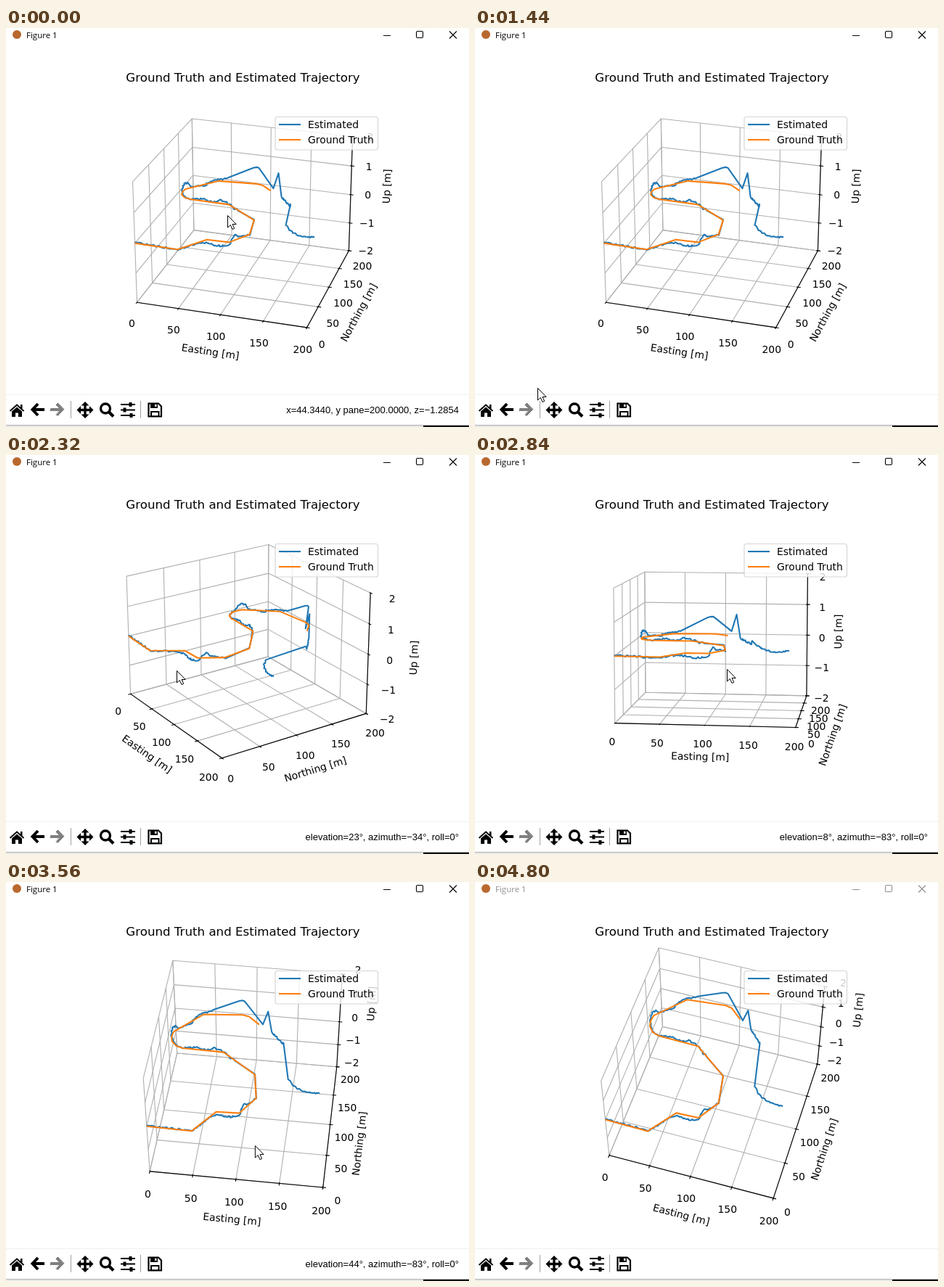
An HTML page with a canvas for the animation above (4.84 s loop, 638 by 550 pixels).

```html
<!DOCTYPE html>
<html lang="en">
<head>
<meta charset="utf-8">
<title>Figure 1</title>
<style>
  html, body { margin: 0; width: 100%; height: 100%; overflow: hidden; background: #fff; }
  canvas { display: block; }
</style>
</head>
<body>
<canvas id="stage" width="638" height="550"></canvas>
<script>
const ctx = document.getElementById('stage').getContext('2d');
const LOOP = 4840, DRAG_START = 1900, DRAG_END = 3960, BLUR = 4480;
const BLUE = '#1f77b4', ORANGE = '#ff7f0e', GRID = '#b0b0b0';
const SANS = '"DejaVu Sans", sans-serif', UI = '"Liberation Sans", Arial, sans-serif';

// Camera: perspective from distance 10, data box scaled to 4:4:3
const CX = 331.6, CY = 262, SCALE = 1998, DIST = 10;
const MID = [100, 100, 0], EXT = [100, 100, 2], HALF = [.59526, .59526, .44644];
const TICKS = [[0, 50, 100, 150, 200], [0, 50, 100, 150, 200], [-2, -1, 0, 1, 2]];
const NAMES = ['Easting [m]', 'Northing [m]', 'Up [m]'];
const SIDE = [1, 0, 0];

// time, cursor x, cursor y, azimuth, elevation
const KEYS = [
  [0, 305, 258, -73, 25], [300, 305, 258, -73, 25], [1100, 100, 470, -73, 25],
  [1440, 86, 496, -73, 25], [1900, 315, 301, -73, 25], [2320, 235, 297, -34, 23],
  [2840, 347, 295, -83, 8], [3280, 365, 347, -93, 34], [3840, 321, 379, -73, 54],
  [3960, 321, 379, -73, 54], [4360, 330, 560, -73, 54], [4840, 330, 560, -73, 54]
];

const truth = [
  [0, 0], [51, -1], [74, 32], [100, 33], [116, 59], [110, 97], [69, 130], [20, 131],
  [12, 134], [6, 141], [4, 149], [5, 158], [36, 193], [83, 198], [91, 196], [105, 183]
].map(p => [...p, 0]);

const estimate = roughen([
  [0, 0, .03], [20, 0, 0], [38, 1, -.03], [51, 0, -.03], [60, 11, -.01], [68, 24, -.03],
  [75, 31, -.09], [90, 30, -.14], [100, 33, -.09], [104, 42, .16], [107, 46, .05],
  [112, 50, .05], [116, 60, -.04], [110, 97, .02], [84, 118, -.02], [70, 129, .03],
  [57, 133, .1], [48, 131, -.01], [35, 132, .05], [20, 131, -.01], [11, 135, .02],
  [4, 147, .05], [4, 156, .22], [7, 161, .2], [10, 163, .04], [23, 175, -.01],
  [28, 186, .04], [36, 194, .04], [47, 198, .11], [78, 200, .53], [82, 200.5, .56],
  [85, 199.5, .56], [89, 196, .5], [110, 177, .17], [116, 178, .71], [121, 174, -.04],
  [136, 160, -.18], [137, 157, -.06], [149, 93, .02], [155, 86, -.04], [166, 81, -.11],
  [177, 79, -.1], [187, 77.5, -.04]
]);

// Adds small seeded steps along short, low segments
function roughen(points) {
  let seed = 7;
  const noise = size => {
    seed = seed * 16807 % 2147483647;
    return (seed / 2147483647 - .5) * size;
  };
  const result = [points[0]];
  points.slice(1).forEach((b, i) => {
    const a = points[i], length = Math.hypot(b[0] - a[0], b[1] - a[1]);
    const smooth = length > 30 || Math.max(a[2], b[2]) > .3;
    const steps = smooth ? 1 : Math.ceil(length / 2);
    for (let k = 1; k < steps; k++) {
      const p = a.map((c, j) => c + (b[j] - c) * k / steps);
      result.push([p[0] + noise(1.6), p[1] + noise(1.6), p[2] + noise(.06)]);
    }
    result.push(b);
  });
  return result;
}

const dot = (a, b) => a[0] * b[0] + a[1] * b[1] + a[2] * b[2];
const put = (p, i, value) => p.map((c, j) => j === i ? value : c);
const minus = s => String(s).replace('-', '\u2212');
let cam;

function setCamera(azimuth, elevation) {
  const a = azimuth * Math.PI / 180, e = elevation * Math.PI / 180;
  const ca = Math.cos(a), sa = Math.sin(a), ce = Math.cos(e), se = Math.sin(e);
  cam = {
    right: [-sa, ca, 0], up: [-se * ca, -se * sa, ce], dir: [ce * ca, ce * sa, se],
    far: [ca > 0 ? 0 : 200, 200, -2], near: [ca > 0 ? 200 : 0, 0, 2]
  };
}

function project(p) {
  const q = p.map((c, i) => (c - MID[i]) / EXT[i] * HALF[i]);
  const k = SCALE / (DIST - dot(q, cam.dir));
  return [CX + k * dot(q, cam.right), CY - k * dot(q, cam.up)];
}

function line(points, color, width) {
  ctx.beginPath();
  points.forEach(p => ctx.lineTo(...project(p)));
  ctx.strokeStyle = color;
  ctx.lineWidth = width;
  ctx.stroke();
}

function text(s, x, y, font, align = 'left', color = '#000') {
  ctx.font = font;
  ctx.textAlign = align;
  ctx.fillStyle = color;
  ctx.fillText(s, x, y);
}

// Moves a point away from the box centre, except along axis i
const outward = (p, i, part) =>
  p.map((c, j) => j === i ? c : c + Math.sign(c - MID[j]) * part * 2 * EXT[j]);

function drawGrid(i) {
  const [j, k] = [0, 1, 2].filter(n => n !== i), { near, far } = cam;
  for (const c of TICKS[i]) {
    const corner = put(far, i, c);
    line([put(corner, j, near[j]), corner, put(corner, k, near[k])], GRID, 1.11);
  }
}

function drawAxis(i) {
  const side = SIDE[i], edge = put(cam.far, side, cam.near[side]);
  const ends = [put(edge, i, TICKS[i][0]), put(edge, i, TICKS[i][4])];
  line(ends, '#000', 1.11);
  for (const c of TICKS[i]) {
    const p = put(edge, i, c), step = Math.sign(p[side] - MID[side]) * EXT[side] / 30;
    line([put(p, side, p[side] - step / 2), put(p, side, p[side] + step)], '#000', 1.11);
    const [x, y] = project(outward(p, i, .0864));
    text(minus(c), x, y + 10.6, '13.9px ' + SANS, 'center');
  }
  const [a, b] = ends.map(project);
  let angle = Math.atan2(a[1] - b[1], b[0] - a[0]);
  if (angle > Math.PI / 2) angle -= Math.PI;
  if (angle < -Math.PI / 2) angle += Math.PI;
  ctx.save();
  ctx.translate(...project(outward(put(edge, i, MID[i]), i, .188)));
  ctx.rotate(-angle);
  text(NAMES[i], 0, 3.2, '13.9px ' + SANS, 'center');
  ctx.restore();
}

function drawLegend() {
  ctx.globalAlpha = .8;
  ctx.beginPath();
  ctx.roundRect(371, 122.5, 141.5, 45.5, 3);
  ctx.fillStyle = '#fff';
  ctx.fill();
  ctx.strokeStyle = '#ccc';
  ctx.lineWidth = 1.2;
  ctx.stroke();
  ctx.globalAlpha = 1;
  [['Estimated', BLUE], ['Ground Truth', ORANGE]].forEach(([name, color], i) => {
    const y = 133 + i * 21;
    ctx.fillStyle = color;
    ctx.fillRect(376, y - 1, 30, 2.1);
    text(name, 416, y + 5, '13.9px ' + SANS);
  });
}

function path(d, width, color = '#000') {
  const shape = new Path2D(d);
  ctx.fillStyle = ctx.strokeStyle = color;
  if (!width) return ctx.fill(shape, 'evenodd');
  ctx.lineWidth = width;
  ctx.stroke(shape);
}

const tile = document.createElement('canvas');
tile.width = tile.height = 2;
const tileCtx = tile.getContext('2d');
tileCtx.fillRect(0, 0, 1, 1);
tileCtx.fillRect(1, 1, 1, 1);
const checker = ctx.createPattern(tile, 'repeat');

function drawToolbar(status) {
  ctx.fillStyle = '#f0f0f0';
  ctx.fillRect(0, 505, 638, 1);
  path('M5.500 528L15 519.500L24.500 528', 2);
  path('M8 528.500L15 522.500L22 528.500V536H17V530.500H13V536H8ZM20 519H22.500V525L20 523Z');
  path('M44 518L36.500 526L44 534M37 526H53', 4);
  path('M70 518L77.500 526L70 534M61 526H77', 4, checker);
  path('M89.500 514V538M185.500 514V538', 1, '#a0a0a0');
  path('M101 526.500H117M109 518.500V534.500', 3.4);
  path('M97.500 526.500L103 521V532ZM120.500 526.500L115 521V532ZM109 515L103.500 520.500H114.500ZM109 538L103.500 532.500H114.500Z');
  path('M130.500 524.500a6.500 6.500 0 1 0 13 0a6.500 6.500 0 1 0 -13 0', 3.3);
  path('M142 529.500L148 535.500', 4.2);
  path('M158 519H178M158 526.500H178M158 534H178', 2);
  path('M171.500 516V522M163.500 523.500V529.500M172.500 531V537', 4);
  path('M196.500 517.500H210L214 521.500V535.500H196.500Z', 2.2);
  path('M199 517H209V524H199ZM205 518.500V522H207.500V518.500ZM199 528H211.500V536H199ZM201 530V534.500H209.500V530Z');
  text(status, 624, 531, '13px ' + UI, 'right');
  ctx.fillStyle = '#b4b4b4';
  ctx.fillRect(0, 547, 638, 1);
  ctx.fillStyle = '#e4e4e4';
  ctx.fillRect(0, 548, 575, 2);
  ctx.fillStyle = '#111';
  ctx.fillRect(575, 548, 63, 2);
}

function drawTitleBar(color) {
  ctx.fillStyle = '#b8692e';
  ctx.beginPath();
  ctx.arc(15, 9, 6, 0, 7);
  ctx.fill();
  text('Figure 1', 28, 14, '11.5px "Open Sans", sans-serif', 'left', color);
  path('M520 10.500H530M611 4.500L621 14.500M621 4.500L611 14.500', 1.1, color);
  ctx.beginPath();
  ctx.roundRect(565.5, 4.5, 9, 9, 1.5);
  ctx.stroke();
}

function drawCursor(x, y) {
  ctx.save();
  ctx.translate(x + .5, y + .5);
  const shape = 'M0 0V16.500L3.800 13L6.500 19L9.200 17.800L6.600 12H11.700Z';
  path(shape, 0, '#fff');
  path(shape, 1);
  ctx.restore();
}

// Data coordinates where the ray under the cursor first meets a back pane
function hoverText(x, y) {
  if (x < 142 || x > 511 || y < 82 || y > 452) return '';
  const { right, up, dir, far } = cam, px = (x - CX) / SCALE, py = (CY - y) / SCALE;
  const ray = dir.map((d, i) => px * right[i] + py * up[i] - d);
  const hits = far.map((c, i) => ((c - MID[i]) / EXT[i] * HALF[i] - DIST * dir[i]) / ray[i]);
  const t = Math.min(...hits);
  return ray.map((r, i) => {
    const value = MID[i] + (DIST * dir[i] + t * r) / HALF[i] * EXT[i];
    return 'xyz'[i] + (hits[i] === t ? ' pane=' : '=') + minus(value.toFixed(4));
  }).join(', ');
}

function pose(t) {
  const i = KEYS.findIndex(k => k[0] > t), a = KEYS[i - 1], b = KEYS[i];
  const u = (t - a[0]) / (b[0] - a[0]), ease = u * u * (3 - 2 * u);
  return a.map((c, j) => c + (b[j] - c) * ease).slice(1);
}

function frame(now) {
  const t = now % LOOP, [x, y, azimuth, elevation] = pose(t);
  setCamera(azimuth, elevation);
  ctx.fillStyle = '#fff';
  ctx.fillRect(0, 0, 638, 550);
  ctx.lineJoin = 'round';
  [0, 1, 2].forEach(drawGrid);
  [0, 1, 2].forEach(drawAxis);
  line(estimate, BLUE, 2.08);
  line(truth, ORANGE, 2.08);
  ctx.lineJoin = 'miter';
  text('Ground Truth and Estimated Trajectory', 326.5, 74, '16.67px ' + SANS, 'center');
  drawLegend();
  drawTitleBar(t < BLUR ? '#000' : '#909090');
  const turning = t >= DRAG_START && t < DRAG_END;
  drawToolbar(turning
    ? `elevation=${minus(Math.round(elevation))}°, azimuth=${minus(Math.round(azimuth))}°, roll=0°`
    : hoverText(x, y));
  drawCursor(x, y);
  requestAnimationFrame(frame);
}
requestAnimationFrame(frame);
</script>
</body>
</html>
```
